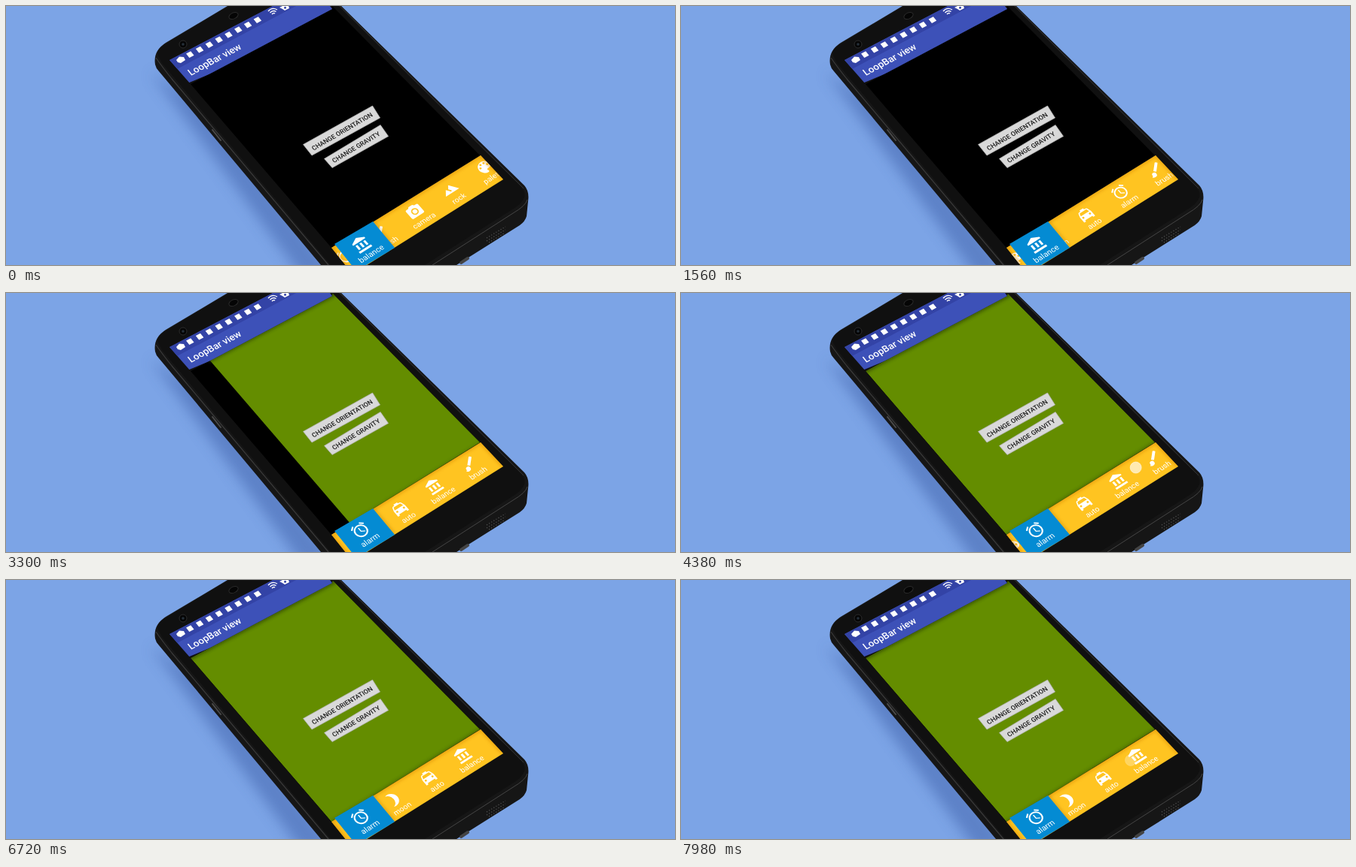
Animation of 888 by 345 pixels, one loop 8000 ms. Source, as an HTML page:

```html
<!DOCTYPE html>
<html lang="en">
<head>
<meta charset="utf-8">
<title>LoopBar view</title>
<style>
  html, body { margin: 0; width: 100%; height: 100%; overflow: hidden; background: #7ca4e6; }
  svg { display: block; width: 888px; height: 345px; }
  text { font-family: Roboto, sans-serif; }
  .item { fill: #fff; font-size: 10px; text-anchor: middle; }
  .button path { fill: #d9d9d9; stroke: #b4b4b4; stroke-width: .8; }
  .button text { font-size: 8.7px; font-weight: 500; text-anchor: middle; fill: #1c1c1c; }
</style>
</head>
<body>
<svg viewBox="0 0 888 345">
  <defs>
    <filter id="soft" x="-20%" y="-20%" width="140%" height="140%"><feGaussianBlur stdDeviation="9"/></filter>
    <filter id="blur" x="-20%" y="-20%" width="140%" height="140%"><feGaussianBlur stdDeviation="2"/></filter>
    <clipPath id="page"><path d="M245 104L433 4V0L629 199L432 322Z"/></clipPath>
    <clipPath id="bar"><path id="barShape" d="M432 322L630 199L660 231L460 357Z"/></clipPath>
    <clipPath id="header"><path d="M217 72L354 0H430L433 4L245 104Z"/></clipPath>
  </defs>

  <path d="M192 88L260 130L440 360H392Z" fill="#3c5ea8" opacity=".5" filter="url(#soft)"/>

  <!-- phone body: side, then face -->
  <path d="M198 78Q195 60 212 49L294 0H445L688 239Q695 247 693 260L691 280Q689 287 682 292L598 345H418L203 87Q199 83 198 78Z" fill="#161616"/>
  <path d="M199 69Q208 82 220 97L428 345" fill="none" stroke="#3a3a3a" stroke-width="1.2"/>
  <path d="M202 66Q198 58 213 50L296 0H441L683 240Q694 251 683 263Q679 267 672 271L556 345H431L207 76Z" fill="#101010"/>
  <path d="M692 258Q690 266 673 276L566 345" fill="none" stroke="#444" stroke-width="1"/>
  <path d="M443 0L687 243" fill="none" stroke="#333" stroke-width="1"/>
  <path d="M274 165L285 179" stroke="#4a4a4a" stroke-width="2" stroke-linecap="round"/>
  <path d="M604 342L613 336" stroke="#444" stroke-width="4" stroke-linecap="round"/>
  <path d="M638 309L663 294M638 313L663 298M641 315L661 303" stroke="#555" stroke-width="1.2" stroke-dasharray="1.2 2.4"/>
  <circle cx="235" cy="51" r="5" fill="#050505" stroke="#2c2c2c"/>
  <circle cx="235" cy="51" r="1.8" fill="#26303a"/>
  <ellipse cx="302" cy="13" rx="6.5" ry="4" transform="rotate(-25 302 13)" fill="#050505" stroke="#2a2a2a"/>

  <!-- pages -->
  <g clip-path="url(#page)">
    <path d="M200 120V0H440L640 200L432 330Z"/>
    <g id="green">
      <path d="M245 104L640 -110L860 60L432 322Z" fill="#648d00"/>
      <path d="M243 104L437 1" stroke="#2c4000" stroke-width="7" opacity=".65" filter="url(#blur)"/>
      <path d="M432 323L632 198" stroke="#2c4000" stroke-width="4" opacity=".5" filter="url(#blur)"/>
    </g>
  </g>

  <!-- status bar and toolbar -->
  <g clip-path="url(#header)">
    <path d="M200 120V0H440V20Z" fill="#3d51b8"/>
    <path d="M217 72L354 0H385L227 84Z" fill="#3343a6"/>
  </g>
  <g id="status" fill="#fff">
    <path d="M226 72L230 67.5L236 68L238 72L232 76L228 75Z"/>
    <path d="M348 7Q353 1 360 5M350.5 9Q354 5 358.500 7.500M353 11Q355 8.500 357 10" fill="none" stroke="#fff" stroke-width="1.4"/>
    <path d="M363 2L367 0H375L376 3L370 6L367 4Z"/>
    <circle cx="370.500" cy="2.200" r="1.500" fill="#3343a6"/>
  </g>
  <text transform="matrix(.882 -.472 .62 .78 245.500 93)" font-size="12.800" font-weight="500" fill="#fff">LoopBar view</text>

  <g class="button">
    <path d="M394.500 184.500L486.500 133L496.500 149L406 199Z"/>
    <text transform="matrix(.862 -.507 .6 .79 448 169.500)">CHANGE ORIENTATION</text>
  </g>
  <g class="button">
    <path d="M422.500 203.500L497 158.500L507.500 173.500L433 215.500Z"/>
    <text transform="matrix(.855 -.518 .6 .79 466.500 190.500)">CHANGE GRAVITY</text>
  </g>

  <!-- loop bar -->
  <use href="#barShape" fill="#ffc421"/>
  <g clip-path="url(#bar)">
    <g id="items"></g>
    <path d="M460 357L432 322L630 199L660 231" fill="none" stroke="#d98a00" stroke-width="4" opacity=".6" filter="url(#blur)"/>
    <path d="M487 287L516 322" stroke="#b87800" stroke-width="3" opacity=".5" filter="url(#blur)"/>
  </g>
  <path d="M436 317L487 287L516 322L465 353Z" fill="#048bd3"/>
  <g id="selected"></g>
  <circle id="touch" r="7.500" fill="#fff" fill-opacity=".65" stroke="#fff" stroke-opacity=".5"/>
</svg>

<script>
const LOOP = 8000;
const STEP = 46.2;      // horizontal distance between neighbouring items
const SLOPE = -0.64;    // direction of the bar on the stage
const $ = id => document.getElementById(id);

const hole = (x, y, r) => `M${x - r} ${y}a${r} ${r} 0 1 0 ${2 * r} 0a${r} ${r} 0 1 0 ${-2 * r} 0z`;
const icons = {
  camera: 'M9 2L7 4H4a2 2 0 0 0-2 2v12a2 2 0 0 0 2 2h16a2 2 0 0 0 2-2V6a2 2 0 0 0-2-2h-3L15 2z' +
    hole(12, 12, 5) + hole(12, 12, 3.2),
  rock: 'M14 6l-3.700 5 2.800 3.800-1.600 1.200L7 10l-6 8h22z',
  palette: 'M12 3a9 9 0 0 0 0 18a1.500 1.500 0 0 0 1-2.600a1.500 1.500 0 0 1 1-2.400H16a5 5 0 0 0 5-5c0-4.400-4-8-9-8z' +
    hole(6.5, 10.5, 1.5) + hole(9.5, 6.5, 1.5) + hole(14.5, 6.5, 1.5) + hole(17.5, 10.5, 1.5),
  moon: 'M6 2.500a10 10 0 0 1 0 19a10 10 0 1 0 0-19z',
  auto: 'M19 6L17.500 5H15V3H9v2H6.500L5 6L3 12v9h3v-2h12v2h3v-9zM5 11l1.500-4.500h11L19 11z' +
    hole(6.5, 14.5, 1.5) + hole(17.5, 14.5, 1.5),
  alarm: 'M22 5.700l-4.600-3.800-1.300 1.500 4.600 3.800zM7.900 3.400L6.600 1.900 2 5.700l1.300 1.500zM12.500 8H11v6l4.700 2.800.8-1.200-4-2.400z' +
    hole(12, 13, 9) + hole(12, 13, 7),
  brush: 'M7 14a3 3 0 0 0-3 3c0 1.300-1.200 2-2 2a5 5 0 0 0 4 2a4 4 0 0 0 4-4a3 3 0 0 0-3-3zM20.700 4.600l-1.300-1.300a1 1 0 0 0-1.400 0L9 12.200 11.700 15l9-9a1 1 0 0 0 0-1.400z',
  balance: 'M4 10v7h3v-7zM10 10v7h3v-7zM16 10v7h3v-7zM2 22h19v-3H2zM11.500 1L2 6v2h19V6z'
};
const order = ['camera', 'rock', 'palette', 'moon', 'auto', 'alarm', 'brush'];

function addItem(parent, name) {
  parent.insertAdjacentHTML('beforeend',
    `<g class="item"><path fill-rule="evenodd" transform="scale(.95) translate(-12 -12)" d="${icons[name]}"/>` +
    `<text x="1" y="20.500">${name}</text></g>`);
  return parent.lastElementChild;
}

function place(node, x, y, scale) {
  node.setAttribute('transform', `translate(${x} ${y}) matrix(.843 -.54 .66 .75 0 0) scale(${scale})`);
  node.style.display = scale > 0 ? '' : 'none';
}

// Seven notification squares follow the first tag along the status bar
for (let i = 0; i < 8; i++) {
  $('status').insertAdjacentHTML('beforeend',
    `<path transform="translate(${244.3 + i * 12.8} ${64.7 - i * 6.6}) matrix(.88 -.47 .62 .78 0 0)" d="M-3.500-3.500h7v7h-7z"/>`);
}

const items = order.map(name => addItem($('items'), name));
const alarmIndex = order.indexOf('alarm');
const balanceInBar = addItem($('items'), 'balance');
const selectedBalance = addItem($('selected'), 'balance');
const selectedAlarm = addItem($('selected'), 'alarm');

const progress = (t, start, end) => Math.min(1, Math.max(0, (t - start) / (end - start)));
const easeOut = (p, power = 2) => 1 - (1 - p) ** power;

// Start, end and distance of each fling, in items
const flings = [[0, 2130, 4.45], [4325, 5560, -2.85], [5880, 6813, 2.05]];
const scrollAt = t => flings.reduce(
  (sum, [start, end, distance]) => sum + distance * easeOut(progress(t, start, end)), 0);

// Start, end and first position of each touch
const touches = [[2700, 2900, 570, 257], [4240, 4600, 592, 240], [5840, 6160, 628, 219], [7920, 8200, 597, 240]];

function render(t) {
  const scroll = scrollAt(t);
  const swap = progress(t, 2900, 3300);
  const oldScale = Math.max(0, 1 - 2 * swap), newScale = Math.max(0, 2 * swap - 1);

  items.forEach((node, i) => {
    const slot = ((i - scroll + 3) % 7 + 7) % 7 - 3;
    const x = 543 + STEP * slot, y = 287 + SLOPE * (x - 522);
    place(node, x, y, i === alarmIndex ? oldScale : 1);
    if (i === alarmIndex) place(balanceInBar, x, y, newScale);
  });
  place(selectedBalance, 472, 317, 1.06 * oldScale);
  place(selectedAlarm, 470.5, 316, 1.06 * newScale);

  const away = 1 - easeOut(progress(t, 3060, 3660), 4);
  $('green').setAttribute('transform', `translate(${200 * away} ${-112 * away})`);
  $('green').style.display = away < 1 ? '' : 'none';

  const touch = touches.find(([start, end]) => t >= start && t < end);
  $('touch').style.display = touch ? '' : 'none';
  if (touch) {
    const [start, end, x, y] = touch;
    const shift = STEP * (scrollAt(start) - scroll);
    $('touch').setAttribute('cx', x + shift);
    $('touch').setAttribute('cy', y + SLOPE * shift);
    $('touch').setAttribute('opacity', Math.min(1, (t - start) / 140, (end - t) / 120));
  }
}

const begin = performance.now();
function frame() {
  render((performance.now() - begin) % LOOP);
  requestAnimationFrame(frame);
}
frame();
</script>
</body>
</html>
```
